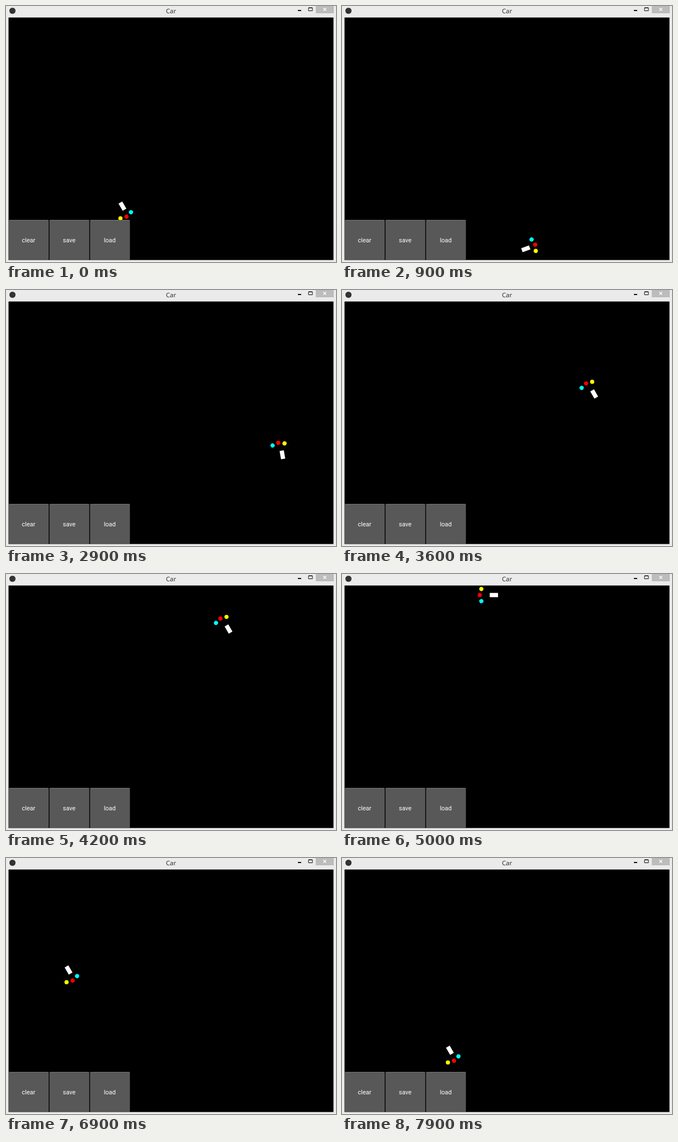
These frames come from a looping animation (588 px wide and 456 px high, 8 s). An HTML page:

```html
<!DOCTYPE html>
<html lang="en">
<head>
<meta charset="utf-8">
<title>Car</title>
<style>
  html, body { margin: 0; width: 100%; height: 100%; overflow: hidden; background: #ebebeb; }
  svg { display: block; }
  text { text-anchor: middle; }
  .title { font: 11.3px "Open Sans", "Noto Sans", sans-serif; fill: #222; }
  .label { font: 11px Roboto, sans-serif; fill: #fff; }
</style>
</head>
<body>
<svg width="588" height="456" viewBox="0 0 588 456">
  <defs>
    <clipPath id="field"><rect x="4" y="20" width="580" height="433"/></clipPath>
  </defs>
  <rect width="588" height="456" fill="#ebebeb"/>
  <circle cx="11.5" cy="8.5" r="5.5" fill="#333"/>
  <text class="title" x="294" y="13">Car</text>
  <rect x="520" y="7" width="6" height="2" fill="#111"/>
  <path d="M539 3.5h7v5h-7zM539 3h7" fill="none" stroke="#111"/>
  <rect x="552" width="32" height="13" fill="#bcbcbc"/>
  <path d="M565.5 3.5l5 5m0-5l-5 5" stroke="#fff" stroke-width="1.4"/>
  <rect x="4.5" y="20.5" width="579" height="432"/>
  <g clip-path="url(#field)">
    <g id="car">
      <rect id="body" x="-7.4" y="-3.8" width="14.8" height="7.6" fill="#fff"/>
      <g id="sensors"></g>
    </g>
    <g id="buttons"></g>
  </g>
</svg>
<script>
const $ = id => document.getElementById(id);
const STEP = 100, STEPS = 80, REACH = 21.65, TURN = 20, SPEED = 17;

// Key points of the drive; headings are in degrees, counter-clockwise from east.
const route = [
  { step: 0, x: 207.5, y: 356.5, heading: -60 },
  { step: 9, x: 327.5, y: 432.5, heading: 12 },
  { step: 18, x: 475, y: 437, heading: 8 },
  { step: 29, x: 492.5, y: 293.5, heading: 100 },
  { step: 42, x: 396.5, y: 98, heading: 120 },
  { step: 54, x: 196, y: 34, heading: 180 },
  { step: 59, x: 97.2, y: 34, heading: 180 },
  { step: 63, x: 89, y: 100, heading: 280 },
  { step: 69, x: 111.5, y: 199.5, heading: 300 },
  { step: 79, x: 192.3, y: 342.5, heading: 300 }
];

for (const p of route) {
  const a = p.heading * Math.PI / 180;
  p.vx = SPEED * Math.cos(a);
  p.vy = -SPEED * Math.sin(a);
}

// Cubic Hermite curve: value and slope at u between two ends.
function hermite(a, b, va, vb, u) {
  const s = 1 - u;
  return [
    s * s * (1 + 2 * u) * a + u * u * (3 - 2 * u) * b + s * u * (s * va - u * vb),
    6 * u * s * (b - a) + s * (1 - 3 * u) * va + u * (3 * u - 2) * vb
  ];
}

function poseAt(step) {
  const i = Math.max(1, route.findIndex(p => p.step >= step));
  const a = route[i - 1], b = route[i];
  const span = b.step - a.step, u = (step - a.step) / span;
  const [x, dx] = hermite(a.x, b.x, a.vx * span, b.vx * span, u);
  const [y, dy] = hermite(a.y, b.y, a.vy * span, b.vy * span, u);
  return { x, y, turn: Math.atan2(dy, dx) * 180 / Math.PI };
}

$("sensors").innerHTML = ["#0ff", "#f00", "#ff0"].map((color, i) =>
  `<circle cx="${REACH}" r="3.7" fill="${color}" transform="rotate(${30 * (i - 1)})"/>`).join("");

$("buttons").innerHTML = ["clear", "save", "load"].map((name, i) =>
  `<g transform="translate(${5 + i * 72.4} 381)">
    <rect width="71" height="71" rx="1" fill="#585858"/>
    <path d="M1 .5h69" stroke="#747474"/>
    <text class="label" x="35.2" y="39.5">${name}</text>
  </g>`).join("");

function draw(now) {
  const { x, y, turn } = poseAt(Math.floor(now / STEP) % STEPS);
  const snapped = Math.round(turn / TURN) * TURN;   // the car steers in fixed steps
  $("car").setAttribute("transform", `translate(${x} ${y})`);
  $("body").setAttribute("transform", `rotate(${snapped})`);
  $("sensors").setAttribute("transform", `translate(-3.6 0) rotate(${snapped})`);
}

const start = performance.now();
function tick() {
  draw(performance.now() - start);
  requestAnimationFrame(tick);
}
tick();
</script>
</body>
</html>
```
